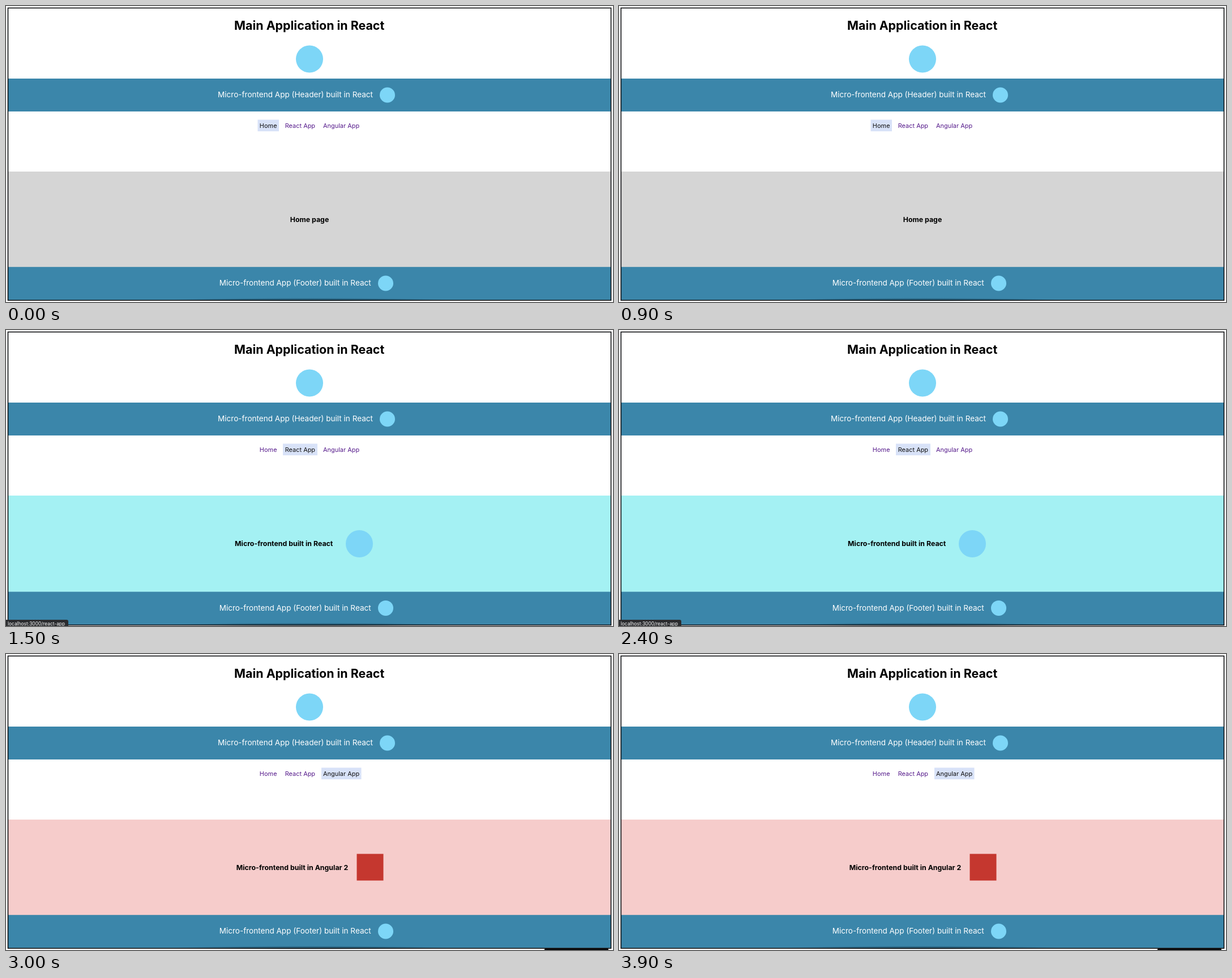
These frames come from a looping animation (1072x522 px, 4500 ms). An HTML page:

```html
<!DOCTYPE html>
<html lang="en">
<head>
<meta charset="utf-8">
<title>Micro-frontend demo</title>
<style>
  html, body { margin: 0; width: 100%; height: 100%; overflow: hidden; background: #fff; }
  svg { display: block; width: 1072px; height: 522px; font-family: Inter, "Open Sans", sans-serif; }
  .bar { fill: #3b86aa; }
  .bar-text { fill: #fff; font-size: 13.55px; text-anchor: middle; }
  .mark { fill: #7dd6f7; }
  .title { font-size: 21.4px; font-weight: 700; text-anchor: middle; }
  .heading { font-size: 12.35px; font-weight: 700; text-anchor: middle; }
  .link { fill: #551a8b; font-size: 10.95px; text-anchor: middle; }
  .link.active { fill: #111; }
  .status { fill: #fff; font-size: 8.4px; }
</style>
</head>
<body>
<svg viewBox="0 0 1072 522">
  <defs>
    <radialGradient id="shade">
      <stop offset="0.5" stop-color="#1d4d66" stop-opacity="0.6"/>
      <stop offset="1" stop-color="#1d4d66" stop-opacity="0"/>
    </radialGradient>
  </defs>

  <text class="title" x="535.7" y="41.5">Main Application in React</text>
  <circle class="mark" cx="536" cy="93.5" r="24"/>

  <rect class="bar" x="4" y="128" width="1064" height="58"/>
  <text class="bar-text" x="511" y="161">Micro-frontend App (Header) built in React</text>
  <circle class="mark" cx="673.5" cy="157" r="13.5"/>

  <rect id="highlight" y="200.5" height="20.5" fill="#d8e2f8"/>
  <text class="link" x="463.2" y="215">Home</text>
  <text class="link" x="519.4" y="215">React App</text>
  <text class="link" x="592.1" y="215">Angular App</text>

  <rect id="panel" x="4" y="292" width="1064" height="172"/>
  <g class="page">
    <text class="heading" x="536" y="381">Home page</text>
  </g>
  <g class="page">
    <text class="heading" x="490.7" y="380.5">Micro-frontend built in React</text>
    <circle class="mark" cx="624" cy="377" r="24"/>
  </g>
  <g class="page">
    <text class="heading" x="505.5" y="381">Micro-frontend built in Angular 2</text>
    <rect x="619.5" y="352.5" width="47" height="47" fill="#c5372f"/>
  </g>

  <g id="footer">
    <rect class="bar" x="4" y="460.2" width="1064" height="58.3"/>
    <ellipse cx="537" cy="518" rx="245" ry="3" fill="url(#shade)"/>
    <text class="bar-text" x="510.7" y="493.3">Micro-frontend App (Footer) built in React</text>
    <circle class="mark" cx="670.5" cy="489" r="13.5"/>
  </g>

  <rect id="border" x="3.5" y="3.5" width="1065" fill="none" stroke="#0b0d10" stroke-width="1.6"/>

  <g class="overlay"></g>
  <g class="overlay">
    <path d="M0 511H107Q110 511 110 514V522H0Z" fill="#2b2c2f"/>
    <text class="status" x="3" y="520.7">localhost:3000/react-app</text>
  </g>
  <g class="overlay">
    <path d="M951 522V520.5Q951 519 953 519H1062Q1064 519 1064 521V522Z" fill="#08090b"/>
  </g>
</svg>
<script>
  const PAGE_MS = 1500;
  const views = [
    { color: "#d5d5d5", tabX: 444.5, tabWidth: 37.5, drop: 0 },
    { color: "#a4f1f3", tabX: 489, tabWidth: 61, drop: 1.4 },
    { color: "#f6cccb", tabX: 557, tabWidth: 70.5, drop: 0 },
  ];
  const byId = id => document.getElementById(id);
  const all = selector => [...document.querySelectorAll(selector)];
  const links = all(".link");
  const layers = [all(".page"), all(".overlay")];

  function show(index) {
    const { color, tabX, tabWidth, drop } = views[index];
    byId("panel").setAttribute("fill", color);
    byId("highlight").setAttribute("x", tabX);
    byId("highlight").setAttribute("width", tabWidth);
    byId("footer").setAttribute("transform", `translate(0 ${drop})`);
    byId("border").setAttribute("height", 515.5 + drop);
    links.forEach((link, i) => link.classList.toggle("active", i === index));
    for (const layer of layers) {
      layer.forEach((group, i) => group.style.display = i === index ? "" : "none");
    }
  }

  const start = performance.now();
  let current = -1;
  function tick() {
    const elapsed = performance.now() - start;
    const index = Math.floor(elapsed / PAGE_MS) % views.length;
    if (index !== current) show(current = index);
    requestAnimationFrame(tick);
  }
  tick();
</script>
</body>
</html>
```
